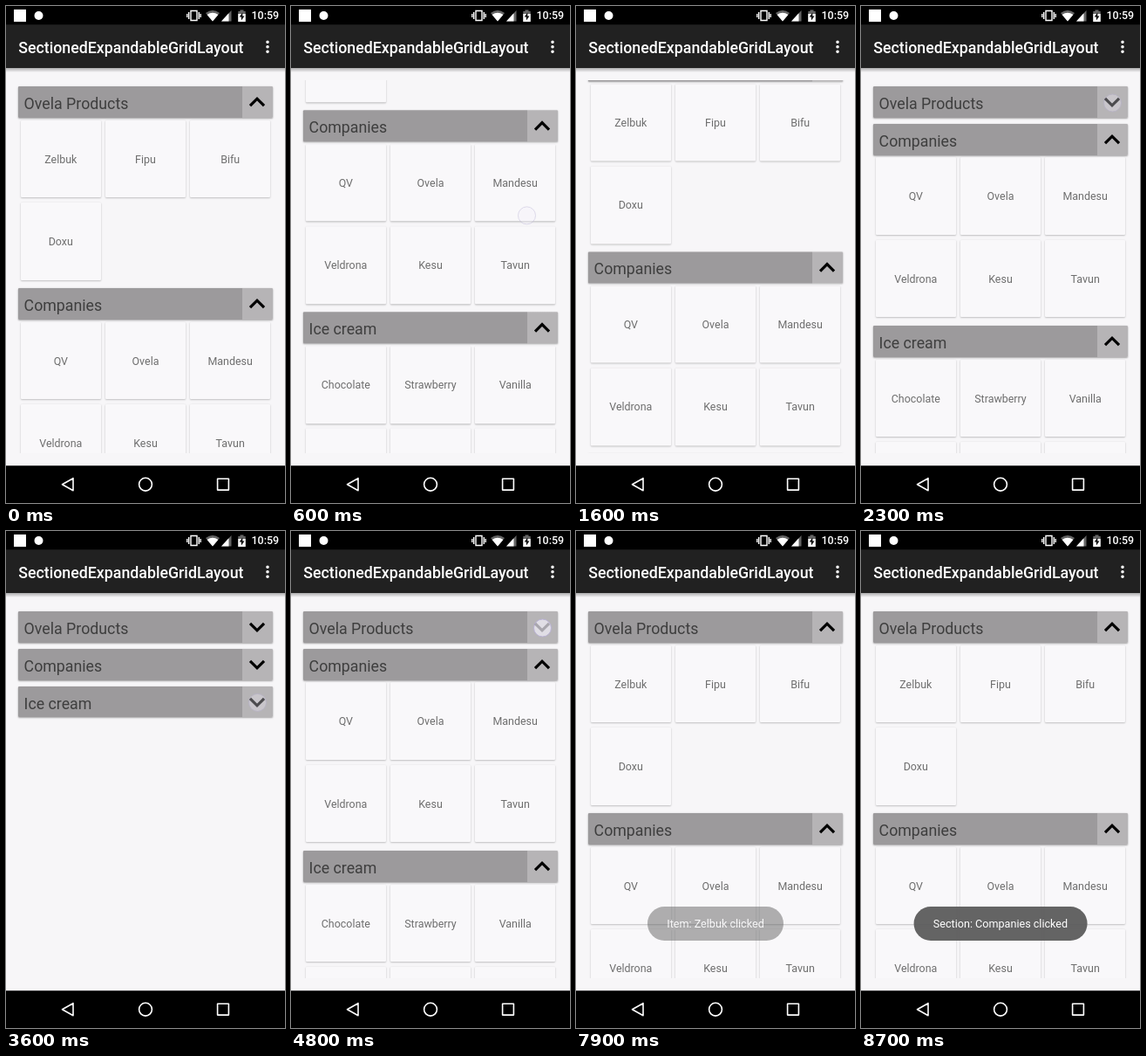
An HTML page that plays this animation: 320 by 569 pixels, repeating every 8900 ms.

```html
<!DOCTYPE html>
<html lang="en">
<head>
<meta charset="utf-8">
<title>SectionedExpandableGridLayout</title>
<style>
html, body { margin: 0; width: 100%; height: 100%; overflow: hidden; }
body { position: relative; background: #f7f6f8; font: 12.44px Roboto, sans-serif; }
body > * { position: absolute; }
#bars { left: 0; top: 0; }
#view { left: 0; top: 85.3px; width: 320px; height: 426.8px; overflow: hidden; }
#list { padding: 0 14.2px; }
.head { box-sizing: border-box; height: 42.7px; padding-top: 7px; }
.head div {
  position: relative; height: 35.6px; line-height: 40px; padding-left: 6.4px;
  background: linear-gradient(90deg, #9c9a9c 256.6px, #b6b4b6 256.6px);
  border-radius: 1px; box-shadow: 0 .7px 2px #0006;
  font-size: 17.78px; color: #3e3e3e;
}
.head svg { position: absolute; left: 264px; top: 8px; }
.closed .head svg { transform: scaleY(-1); }
.closed .grid { display: none; }
.grid { display: grid; grid-template-columns: repeat(3, 1fr); grid-auto-rows: 94.2px; }
.card {
  margin: 2.8px; line-height: 89px; text-align: center; color: #6e6e6e;
  background: #f9f8fa; border-radius: 1px; box-shadow: 0 .8px 2px #0004;
}
#toast {
  left: 50%; top: 430.3px; height: 38.8px; line-height: 39.5px; padding: 0 22.3px;
  transform: translateX(-50%); white-space: nowrap;
  border-radius: 20px; background: #5c5c5cf2; color: #fff; font-size: 12.6px;
}
#touch {
  left: -10.5px; top: -10.5px; width: 19px; height: 19px;
  border: 1px solid #b9b2d4; border-radius: 50%; background: #f3f0fbb0;
}
</style>
</head>
<body>
<div id="view"><div id="list"></div></div>
<svg id="bars" width="320" height="569" fill="#fff" font-weight="500">
  <defs>
    <linearGradient id="shade" x2="0" y2="1">
      <stop stop-opacity=".3"/><stop offset="1" stop-opacity="0"/>
    </linearGradient>
  </defs>
  <path fill="url(#shade)" d="M0 71h320v5H0z"/>
  <path fill="#212121" d="M0 21h320v50.1H0z"/>
  <path fill="#000" d="M0 0h320v21.3H0zM0 526.3h320V569H0z"/>
  <path d="M9 4h14v14H9z"/>
  <circle cx="37.5" cy="11" r="5"/>
  <path d="M212 5.5h7v11h-7zM209.7 7v8M221.3 7v8M207.8 9v4M223.2 9v4"
    fill="none" stroke="#fff" stroke-width="1.4"/>
  <g fill="#666">
    <path d="M229 8q8-6 16 0l-8 9.5z"/>
    <path d="M247 17.5h11.5V5z"/>
    <path d="M266.3 6h2.2V4.5h4V6h2.2v12h-8.4z"/>
  </g>
  <path d="M230.6 10q6.4-4.5 12.8 0L237 17.5zM247 17.5h8.5V8.3zM266.3 9h8.4v9h-8.4z"/>
  <path d="M271.3 7.5l-3.6 5h2.2v4l3.6-5h-2.2z" fill="#000"/>
  <text x="281.5" y="15.4" font-size="12.44">10:59</text>
  <text x="14.2" y="53.5" font-size="17.78">SectionedExpandableGridLayout</text>
  <path d="M300 41.3v11.1" stroke="#fff" stroke-width="3.6" stroke-linecap="round"
    stroke-dasharray="0 5.5"/>
  <g fill="none" stroke="#fff" stroke-width="1.6" stroke-linejoin="round">
    <path d="M64.5 547.7l12.5-7v14zM242.6 541.3h12.8v12.8h-12.8z"/>
    <circle cx="160" cy="547.7" r="7.4"/>
  </g>
</svg>
<div id="toast"></div>
<div id="touch"></div>
<script>
const LOOP = 8900, STEP = 100, FADE = 400;
const HEAD = 42.7, MAX_SCROLL = 266.3;
const sections = [
  ['Ovela Products', 'Zelbuk', 'Fipu', 'Bifu', 'Doxu'],
  ['Companies', 'QV', 'Ovela', 'Mandesu', 'Veldrona', 'Kesu', 'Tavun'],
  ['Ice cream', 'Chocolate', 'Strawberry', 'Vanilla', 'Butterscotch', 'Grape', 'Tutti frutti']
];
const toasts = [
  { text: 'Item: Zelbuk clicked', from: 5700, until: 8100 },
  { text: 'Section: Companies clicked', from: 8300, until: Infinity }
];

// Sections close from top to bottom, then open from bottom to top.
const closeTime = i => 2300 + 650 * i;
const openTime = i => 4900 - 350 * i;

const press = (end, x, y, hold = 150) => ({ start: end - hold, end, x, y });
const presses = [
  press(600, 270, 443, 300),
  press(1500, 262, 275 + MAX_SCROLL, 300),
  ...sections.flatMap((_, i) =>
    [closeTime(i), openTime(i)].map(end => press(end, 288, 110.5 + HEAD * i))),
  press(5750, 92, 188),
  press(8250, 190, 347)
];

const $ = id => document.getElementById(id);
const list = $('list'), toast = $('toast'), touch = $('touch');

list.innerHTML = sections.map(([name, ...items]) => `<section>
  <div class="head"><div>${name}<svg width="20" height="20" fill="none" stroke="#000"
    stroke-width="3.2"><path d="M2 14.2l8-8 8 8"/></svg></div></div>
  <div class="grid">${items.map(item => `<div class="card">${item}</div>`).join('')}</div>
</section>`).join('');

const clamp = u => Math.min(1, Math.max(0, u));
const ease = u => (u = clamp(u), u * u * (3 - 2 * u));

function draw(t) {
  const offset = MAX_SCROLL * (ease((t - 300) / 438) - ease((t - 1300) / 400));
  list.style.transform = `translateY(${-offset}px)`;

  sections.forEach((_, i) =>
    list.children[i].classList.toggle('closed', t >= closeTime(i) && t < openTime(i)));

  const p = presses.find(p => t >= p.start && t < p.end + STEP);
  touch.style.opacity = !p ? 0 : t < p.end ? 1 : .45;
  if (p) touch.style.transform = `translate(${p.x}px, ${p.y - offset}px)`;

  const { text, from, until } = toasts.find(n => t < n.until);
  toast.textContent = text;
  toast.style.opacity = clamp((t - from) / FADE) * clamp((until - t) / FADE);
}

const start = performance.now();
function frame() {
  const t = (performance.now() - start) % LOOP;
  draw(Math.floor(t / STEP) * STEP);
  requestAnimationFrame(frame);
}
frame();
</script>
</body>
</html>
```
